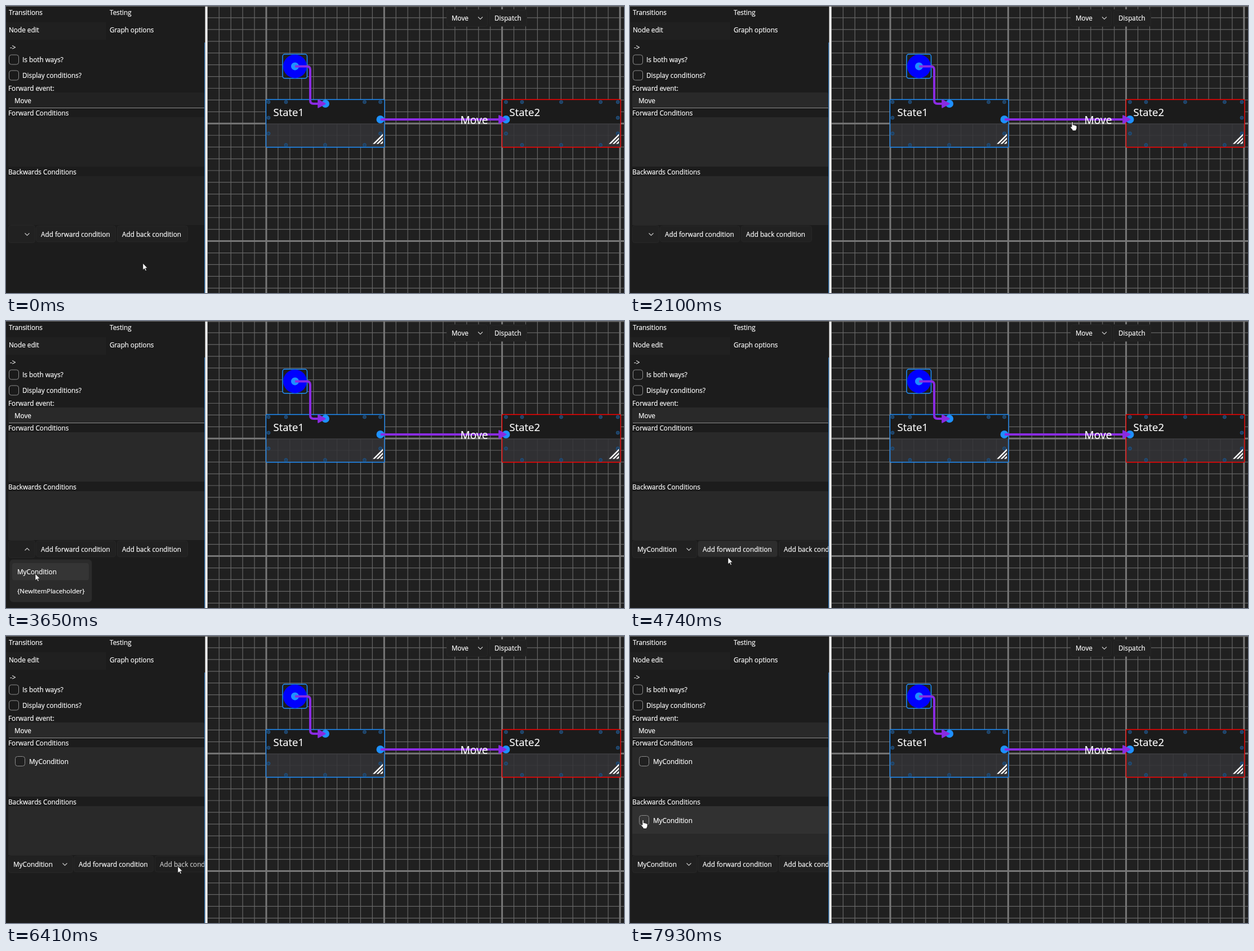
Recreate the animation shown at these times as an HTML page. Size 1097 by 511 pixels, loop 8 s.

```html
<!DOCTYPE html>
<html lang="en">
<head>
<meta charset="utf-8">
<title>State graph editor</title>
<style>
  html, body { margin: 0; width: 100%; height: 100%; overflow: hidden; background: #1c1c1c; }
  svg { display: block; width: 1097px; height: 511px; }
  text {
    font-family: "Open Sans", "Noto Sans", sans-serif; font-size: 11.75px; white-space: pre;
    color: #fff; fill: currentColor; stroke: currentColor; stroke-width: .2px;
  }
  .chev { fill: none; stroke: #ccc; stroke-width: 1.1; }
  .check { stroke: #8c8c8c; fill: #1a1a1a; }
  .btn { stroke: #272727; fill: #212121; }
</style>
</head>
<body>
<svg id="stage" viewBox="0 0 1097 511"></svg>
<script>
const LOOP = 8000;
const stage = document.getElementById('stage');

// Markup helpers
const rect = (x, y, w, h, attrs = '') => `<rect x="${x}" y="${y}" width="${w}" height="${h}" ${attrs}/>`;
const text = (x, y, s, attrs = '') => `<text x="${x}" y="${y}" ${attrs}>${s}</text>`;
const dot = (x, y, r, attrs) => `<circle cx="${x}" cy="${y}" r="${r}" ${attrs}/>`;
const path = (d, attrs) => `<path d="${d}" ${attrs}/>`;
const group = (id, body, attrs = '') => `<g id="${id}" ${attrs}>${body}</g>`;
const check = (x, y, attrs = '') => rect(x + .5, y + .5, 17, 17, `rx="4" class="check" ${attrs}`);
const chevron = 'M-4 -2L0 2L4 -2';

function grid() {
  const cell = 20.93;
  let minor = '', major = '';
  for (let i = -5; i <= 30; i++) {
    const d = `M${(462 + i * cell).toFixed(2)} 0V511`;
    if (i % 10) minor += d; else major += d;
  }
  for (let i = 0; i <= 24; i++) {
    const d = `M357 ${(i * cell).toFixed(2)}H1097`;
    if (i % 10) minor += d; else major += d;
  }
  return rect(357, 0, 740, 511, 'fill="#202020"') +
    path(minor, 'stroke="#666" stroke-width="1.2"') +
    path(major, 'stroke="#777" stroke-width="3"');
}

// Striped resize corner ending at the right edge x
function grip(x) {
  const stripe = a => `M${x - 18 + a} 245.5L${x} ${227.5 + a}v3.6L${x - 14.4 + a} 245.5z`;
  return path([0, 6.4, 12.8].map(stripe).join(''), 'fill="#fff"');
}

// left and right are the x positions of the connector columns
function node(id, name, x, left, right, color) {
  const spots = [
    ...[left, x + 36, x + 175.5, right].map(cx => [cx, 171]),
    ...[x + 36, x + 105.5, x + 175.5].map(cx => [cx, 247.5]),
    [left, 227], [right, 227],
    ...(id === 'one' ? [[left, 199]] : [[x + 105.5, 171], [right, 199]])
  ];
  return rect(x, 166.5, 211, 43, 'fill="#1b1b1b"') +
    rect(x, 209, 211, 42.5, 'fill="#333337" fill-opacity=".85"') +
    rect(x + .5, 166.5, 210.5, 85, `id="${id}" rx="1.5" fill="none" stroke="${color}" stroke-width="1.3"`) +
    spots.map(([cx, cy]) => dot(cx, cy, 2.9, 'fill="#20405f" stroke="#1f558a"')).join('') +
    grip(x + 208) +
    text(x + 13.5, 196, name, 'style="font-size:18.5px"');
}

function graph() {
  const port = 'fill="#1e90ff"';
  const wire = 'fill="none" stroke="#8a2be2" stroke-width="4"';
  const head = (x, y) => path(`M${x} ${y}l-13 -7v14z`, 'fill="#8a2be2" stroke="#8a2be2" stroke-width="1.6" stroke-linejoin="round"');
  return grid() +
    rect(782, 6, 143, 30.5, 'rx="4" fill="#202020"') +
    rect(782.5, 6.5, 72, 30, 'rx="4" class="btn"') + text(791, 26, 'Move') +
    path(chevron, 'class="chev" transform="translate(842 21.5)"') +
    rect(858.5, 7.5, 66, 28, 'rx="4" class="btn"') + text(867, 26, 'Dispatch') +
    rect(491, 85.8, 43.5, 43, 'rx="4" fill="#1e1e1e" stroke="#1e90ff" stroke-width="1.5"') +
    dot(513, 107.4, 21, 'fill="#00f"') + dot(513, 107.4, 7, port) +
    node('one', 'State1', 461, 466, 664.5, '#1e90ff') +
    node('two', 'State2', 880, 887.5, 1086, '#f00') +
    dot(567, 174, 7, port) + dot(664.5, 202, 7, port) + dot(887.5, 202, 7, port) +
    path('M513 107.4H534Q540 107.4 540 113.4V168Q540 174 546 174H556', wire) + head(567, 174) +
    path('M665 202H877', wire) + head(888, 202) +
    text(0, 210, 'Move', 'id="label" style="font-size:19.2px"');
}

function form() {
  const list = 'class="list"';
  const button = (id, x, w, s) => rect(x + .5, 391.5, w, 28.5, `id="${id}Box" rx="4" class="btn"`) +
    text(x + 9, 410.5, s, `id="${id}Text"`);
  return text(7, 78, '-&gt;') +
    check(5, 86.5) + text(29, 99.5, 'Is both ways?') +
    check(5, 114.5) + text(29, 127.5, 'Display conditions?') +
    text(4, 150.5, 'Forward event:') +
    rect(4, 154, 348, 27.5, `rx="3" ${list}`) + rect(5, 181, 347, 1, 'fill="#8d8d8d"') + text(15, 172.5, 'Move') +
    text(4, 194.5, 'Forward Conditions') + rect(4, 198, 348, 88, list) +
    group('forwardItem', check(16, 214, 'fill-opacity=".6"') + text(41, 227.5, 'MyCondition')) +
    text(4, 299.5, 'Backwards Conditions') + rect(4, 303, 348, 87, list) +
    group('backItem', rect(4, 303, 348, 49, 'id="row" fill="#313131"') +
      check(16, 319, 'id="box"') + path('M21 328l3 3.2 6-6.4', 'id="tick" fill="none" stroke="#000" stroke-width="1.4"') +
      text(41, 332.5, 'MyCondition')) +
    rect(4.5, 390.5, 47, 31, 'id="combo" rx="4" class="btn"') + text(13, 411, 'MyCondition', 'id="chosen"') +
    path(chevron, 'id="arrow" class="chev"') +
    group('buttons', button('fwd', 53, 141, 'Add forward condition') + button('back', 197, 125, 'Add back condition')) +
    group('popup', rect(6.5, 424.5, 146, 76, 'rx="6" fill="#2b2b2b" stroke="#222"') +
      rect(11, 431, 136, 30.5, 'rx="4" fill="#353535"') +
      text(20, 451, 'MyCondition') + text(20, 485, '{NewItemPlaceholder}', 'style="font-size:11.45px"'));
}

stage.innerHTML =
  '<clipPath id="side"><rect width="353" height="511"/></clipPath>' +
  graph() +
  group('panel',
    rect(0, 0, 354, 511, 'fill="#1c1c1c"') + rect(0, 29, 177.5, 31, 'fill="#202020"') +
    text(5, 15.5, 'Transitions') + text(184, 15.5, 'Testing') +
    text(5, 47, 'Node edit') + text(184, 47, 'Graph options') +
    text(3.5, 78, 'State1', 'id="picked"') + group('form', form()),
    'clip-path="url(#side)"') +
  rect(352, 65, 1.6, 446, 'fill="#2b6cab"') + rect(353.5, 0, 4, 511, 'fill="#f0f0f0"') +
  rect(0, 0, 1097, 1, 'fill="#666"') +
  path('M0 0V12l2.7-2.6 1.9 4.2 1.8-.8-1.9-4h3.7z', 'id="pointer" fill="#fff" stroke="#000" stroke-width=".6"') +
  path('M-1 1.2Q0-.6 1.3 1V6Q2.8 5 3.7 6.3 5.2 5.6 6 7 7.8 6.6 8 8.2V11.5Q7.8 13.5 6.7 14.5V16H.3V14.6L-3 10.5Q-3.4 8.8-2 8.6L-1 9.6Z',
    'id="hand" fill="#fff" stroke="#000" stroke-width=".7"');

const ui = {};
stage.querySelectorAll('[id]').forEach(el => ui[el.id] = el);
const lists = stage.querySelectorAll('.list');

const show = (el, on) => el.setAttribute('visibility', on ? 'inherit' : 'hidden');
const set = (el, attrs) => { for (const k in attrs) el.setAttribute(k, attrs[k]); };
const within = (t, a, b) => t >= a && t < b;

// Cursor legs: first step, last step, number of steps, destination
const legs = [
  [90, 640, 7, 596, 187],
  [910, 1180, 4, 776, 196],
  [1360, 1450, 2, 785, 206],
  [2380, 2870, 7, 48, 420],
  [2950, 3110, 3, 20, 410],
  [3470, 3650, 3, 52, 450],
  [4380, 4740, 5, 174, 421],
  [4830, 5100, 4, 178, 410],
  [5720, 6050, 5, 305, 410],
  [6650, 7190, 5, 23, 327]
];

function cursorAt(t) {
  let x = 243, y = 458;
  for (const [start, end, steps, toX, toY] of legs) {
    if (t < start) break;
    const k = Math.min(steps, Math.floor((t - start) / (end - start) * (steps - 1) + 1e-6) + 1) / steps;
    const e = k * k * (3 - 2 * k);
    x += (toX - x) * e;
    y += (toY - y) * e;
  }
  return [x, y];
}

function paintButton(name, left, right, pressed, x, y) {
  const hover = x >= left && x <= right && y >= 391 && y <= 422;
  ui[name + 'Box'].style.fill = pressed ? '#1e1e1e' : hover ? '#2d2d2d' : '#212121';
  ui[name + 'Text'].style.color = pressed ? '#c8c8c8' : '#fff';
}

function boxFill(t) {
  if (within(t, 7430, 7870)) return '#4a9be0';
  if (within(t, 7870, 7930)) return '#3f82ba';
  if (within(t, 7340, 7430)) return '#3f3f3f';
  return t >= 7190 ? '#363636' : '#222';
}

function render(t) {
  const [x, y] = cursorAt(t);
  const nodePicked = within(t, 730, 2100);
  const chosen = t >= 4020;
  const shift = chosen ? 67 : 0;

  show(ui.picked, nodePicked);
  show(ui.form, !nodePicked);
  set(ui.one, nodePicked
    ? { x: 461, y: 166, width: 212, height: 86.5, rx: 3, stroke: '#ffa500', 'stroke-width': 2.6 }
    : { x: 461.5, y: 166.5, width: 210.5, height: 85, rx: 1.5, stroke: '#1e90ff', 'stroke-width': 1.3 });
  set(ui.label, { x: nodePicked ? 695 : 806.5 });
  lists.forEach(el => el.setAttribute('fill', t < 730 ? '#222' : '#292929'));

  // Combo box and its popup
  const open = within(t, 3200, 4110);
  show(ui.popup, open);
  set(ui.popup, {
    opacity: t < 3290 ? .7 : chosen ? .5 : 1,
    transform: `translate(0 ${t < 3290 ? -6 : 0})`
  });
  show(ui.chosen, chosen);
  set(ui.combo, { width: 47 + shift });
  set(ui.arrow, { transform: `translate(${37.5 + shift} 406.5) scale(1 ${open && !chosen ? -1 : 1})` });
  set(ui.buttons, { transform: `translate(${shift} 0)` });
  paintButton('fwd', 53 + shift, 194 + shift, within(t, 5380, 5450), x, y);
  paintButton('back', 197 + shift, 353, within(t, 6410, 6470), x, y);

  // Added conditions
  show(ui.forwardItem, t >= 5450);
  show(ui.backItem, t >= 6470);
  show(ui.row, t >= 6470 && y >= 303 && y <= 352);
  show(ui.tick, within(t, 7430, 7930));
  ui.box.style.fill = boxFill(t);

  const hand = within(t, 1450, 2380) || t >= 7190;
  const place = { transform: `translate(${x.toFixed(2)} ${y.toFixed(2)})` };
  show(ui.pointer, !hand);
  show(ui.hand, hand);
  set(ui.pointer, place);
  set(ui.hand, place);
}

const began = performance.now();
function tick() {
  render((performance.now() - began) % LOOP);
  requestAnimationFrame(tick);
}
tick();
</script>
</body>
</html>
```
